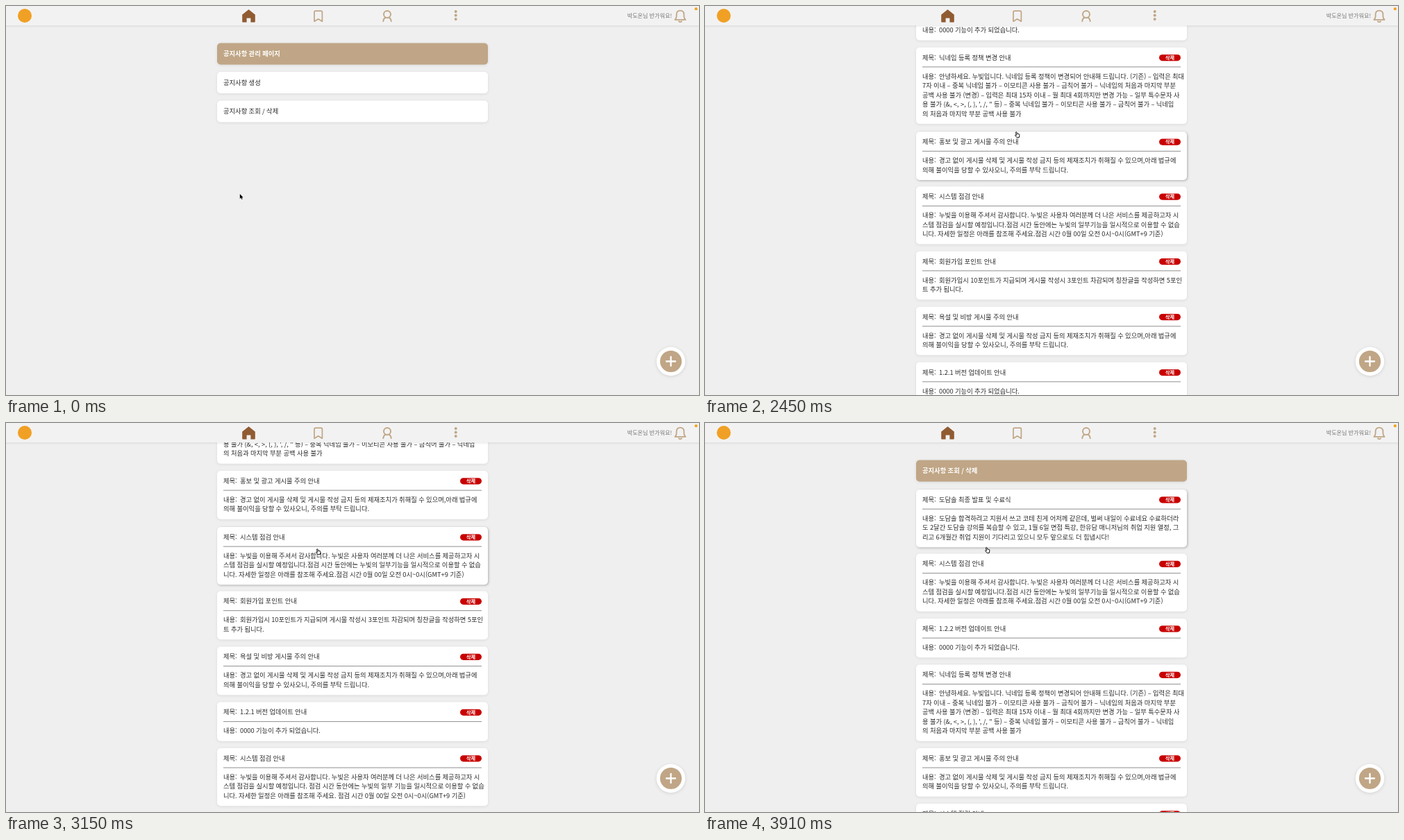
An HTML page with a canvas for the animation above (3970 ms loop, 998 px wide and 561 px high).

```html
<!DOCTYPE html>
<html lang="ko">
<head>
<meta charset="utf-8">
<title>공지사항</title>
<style>
html, body { margin: 0; width: 100%; height: 100%; overflow: hidden; background: #efefef; }
canvas { display: block; width: 998px; height: 561px; }
</style>
</head>
<body>
<canvas id="stage"></canvas>
<script>
const W = 998, H = 561, LOOP = 3970, STEP = 50;
const TAN = '#c0a686', BROWN = '#915b32', INK = '#2b2b2b';
const FAMILY = '"Noto Sans CJK KR", "Noto Sans CJK", sans-serif';
const LEFT = 304, WIDTH = 390, TEXT_X = 313, VALUE_X = 337;
const LIST_AT = 1700, OPEN_AT = 700;

const canvas = document.getElementById('stage');
const ctx = canvas.getContext('2d');
const dpr = window.devicePixelRatio || 1;
canvas.width = W * dpr;
canvas.height = H * dpr;

const maintenance = [
  '누빛을 이용해 주셔서 감사합니다. 누빛은 사용자 여러분께 더 나은 서비스를 제공하고자 시',
  '스템 점검을 실시할 예정입니다.점검 시간 동안에는 누빛의 일부기능을 일시적으로 이용할 수 없습',
  '니다. 자세한 일정은 아래를 참조해 주세요.점검 시간 0월 00일 오전 0시~0시(GMT+9 기준)'
];
const warning = [
  '경고 없이 게시물 삭제 및 게시물 작성 금지 등의 제재조치가 취해질 수 있으며,아래 법규에',
  '의해 불이익을 당할 수 있사오니, 주의를 부탁 드립니다.'
];
const update = ['0000 기능이 추가 되었습니다.'];

const notices = [
  ['도담솔 최종 발표 및 수료식', [
    '도담솔 합격하려고 지원서 쓰고 코테 친게 어저께 같은데, 벌써 내일이 수료네요 수료하더라',
    '도 2달간 도담솔 강의를 복습할 수 있고, 1월 6일 면접 특강, 한유담 매니저님의 취업 지원 열정, 그',
    '리고 6개월간 취업 지원이 기다리고 있으니 모두 앞으로도 더 힘냅시다!']],
  ['시스템 점검 안내', maintenance],
  ['1.2.2 버전 업데이트 안내', update],
  ['닉네임 등록 정책 변경 안내', [
    '안녕하세요. 누빛입니다. 닉네임 등록 정책이 변경되어 안내해 드립니다. (기존) – 입력은 최대',
    '7자 이내 – 중복 닉네임 불가 – 이모티콘 사용 불가 – 금칙어 불가 – 닉네임의 처음과 마지막 부분',
    '공백 사용 불가 (변경) – 입력은 최대 15자 이내 – 월 최대 4회까지만 변경 가능 – 일부 특수문자 사',
    '용 불가 (&, <, >, (, ), \', /, " 등) – 중복 닉네임 불가 – 이모티콘 사용 불가 – 금칙어 불가 – 닉네임',
    '의 처음과 마지막 부분 공백 사용 불가']],
  ['홍보 및 광고 게시물 주의 안내', warning],
  ['시스템 점검 안내', maintenance],
  ['회원가입 포인트 안내', [
    '회원가입시 10포인트가 지급되며 게시물 작성시 3포인트 차감되며 칭찬글을 작성하면 5포인',
    '트 추가 됩니다.']],
  ['욕설 및 비방 게시물 주의 안내', warning],
  ['1.2.1 버전 업데이트 안내', update],
  ['시스템 점검 안내', maintenance.map(s => s.replace('.점검', '. 점검').replace('일부기능', '일부 기능'))]
];

const clamp = (v, a, b) => Math.min(b, Math.max(a, v));
const span = (t, a, b) => clamp((t - a) / (b - a), 0, 1);
const smooth = u => u * u * (3 - 2 * u);
const lerp = (a, b, u) => a + (b - a) * u;

function scrollAt(t) {
  if (t < 3180) return 400 * (1 - (1 - span(t, 2100, 3108)) ** 3);
  return 400 * (1 - span(t, 3180, 3780)) ** 2;
}

// Pointer legs: start, end, target x, target y
const legs = [
  [0, 450, 415.5, 153.2],
  [1650, 1850, 436, 173],
  [2100, 2350, 448, 181.3],
  [3700, 3900, 405, 179]
];
function pointerAt(t) {
  let x = 336.8, y = 271;
  for (const [a, b, tx, ty] of legs) {
    const u = smooth(span(t, a, b));
    x = lerp(x, tx, u);
    y = lerp(y, ty, u);
  }
  return { x, y };
}

function text(s, x, mid, color = INK, size = 9.3, weight = 400, align = 'left') {
  ctx.font = `${weight} ${size}px ${FAMILY}`;
  ctx.fillStyle = color;
  ctx.textAlign = align;
  ctx.wordSpacing = '0.3px';
  ctx.fillText(s, x, mid + size * 0.375);
}

function box(x, y, w, h, r, color) {
  ctx.fillStyle = color;
  ctx.beginPath();
  ctx.roundRect(x, y, w, h, r);
  ctx.fill();
}

function disc(x, y, r, color) {
  ctx.fillStyle = color;
  ctx.beginPath();
  ctx.arc(x, y, r, 0, Math.PI * 2);
  ctx.fill();
}

function shadowed(dx, dy, blur, alpha, draw) {
  ctx.save();
  ctx.shadowColor = `rgba(0,0,0,${alpha})`;
  ctx.shadowOffsetX = dx * dpr;
  ctx.shadowOffsetY = dy * dpr;
  ctx.shadowBlur = blur * dpr;
  draw();
  ctx.restore();
}

function card(y, h, hover, color = '#fff') {
  const draw = () => box(LEFT, y, WIDTH, h, 5, color);
  if (hover) shadowed(1, 1, 3.5, 0.28, draw);
  else shadowed(0, 1, 4, 0.09, draw);
}

function isOver(p, y, h) {
  return p.x > LEFT && p.x < LEFT + WIDTH && p.y >= y && p.y <= y + h + 1;
}

function pageTitle(s, scroll = 0) {
  card(53.5 - scroll, 31, false, TAN);
  text(s, TEXT_X, 69 - scroll, '#fff', 9.3, 700);
}

function menuPage(p) {
  pageTitle('공지사항 관리 페이지');
  let hit = false;
  ['공지사항 생성', '공지사항 조회 / 삭제'].forEach((s, i) => {
    const y = 95 + i * 41.5;
    const hover = isOver(p, y, 31);
    const shift = hover ? 1 : 0;
    card(y + shift, 31, hover);
    text(s, TEXT_X, y + 15.5 + shift, INK, 9.3, 500);
    hit = hit || hover;
  });
  pointer(p, hit);
}

function emptyPage(p) {
  pageTitle('공지사항 조회 / 삭제');
  card(95, 29.5, false);
  text('공지사항이 없습니다', TEXT_X, 109.3);
  pointer(p, false);
}

function notice(title, lines, y, h, hover) {
  card(y, h, hover);
  text('제목:', TEXT_X, y + 14.4);
  text(title, VALUE_X, y + 14.4);
  box(654, y + 10.2, 31, 9.2, 4.6, '#c80000');
  text('삭제', 669.5, y + 14.4, '#fff', 7.2, 700, 'center');
  ctx.fillStyle = '#8f8f8f';
  ctx.fillRect(TEXT_X, y + 27.6, 372, 1);
  text('내용:', TEXT_X, y + 41.3);
  lines.forEach((s, i) => text(s, i ? TEXT_X : VALUE_X, y + 41.3 + i * 13.5));
}

function listPage(p, scroll) {
  pageTitle('공지사항 조회 / 삭제', scroll);
  let y = 95 - scroll;
  for (const [title, lines] of notices) {
    const h = 42.8 + 13.5 * lines.length;
    const hover = isOver(p, y, h);
    if (y + h > 0 && y < H) notice(title, lines, y + (hover ? 1 : 0), h, hover);
    y += h + 10.2;
  }
  pointer(p, true);
}

function stroke(d, color, width) {
  ctx.strokeStyle = color;
  ctx.lineWidth = width;
  ctx.lineJoin = ctx.lineCap = 'round';
  ctx.stroke(new Path2D(d));
}

function topBar() {
  shadowed(0, 1, 3, 0.1, () => {
    ctx.fillStyle = '#f2f2f2';
    ctx.fillRect(-10, -10, W + 20, 38);
  });
  disc(27, 14, 10, '#f0a024');
  ctx.fillStyle = BROWN;
  ctx.fill(new Path2D('M349.5 5 L358.8 12.6 V22.6 Q358.8 23.6 357.8 23.6 H352.4 V17.6 H346.6 V23.6 H341.2 Q340.2 23.6 340.2 22.6 V12.6 Z'));
  stroke('M444 22.2 V9 Q444 7.2 445.8 7.2 H453.6 Q455.4 7.2 455.4 9 V22.2 L449.7 18.8 Z', TAN, 1.7);
  stroke('M554 12 A5 5 0 1 1 544 12 A5 5 0 1 1 554 12 M543.3 22 Q543.8 17.6 547 16.7 M554.7 22 Q554.2 17.6 551 16.7', TAN, 1.9);
  for (const y of [8, 13.5, 19]) disc(647.7, y, 2, TAN);
  text('박도온님 반가워요!', 959, 14.3, '#777', 8.1, 400, 'right');
  stroke('M963.4 19.8 H978.6 Q976.4 17.6 976.4 15 V12.2 Q976.4 6.6 971 6.6 Q965.6 6.6 965.6 12.2 V15 Q965.6 17.6 963.4 19.8 Z M969 22.3 Q971 24 973 22.3', TAN, 1.8);
  disc(993.8, 4.2, 2.1, '#f5a11c');
}

function addButton() {
  shadowed(0, 1, 5, 0.12, () => disc(957.5, 512.5, 20.7, '#fff'));
  disc(957.5, 512.5, 15.6, TAN);
  stroke('M951 512.5 H964 M957.5 506 V519', '#fff', 2.3);
}

const ARROW = new Path2D('M0 0 V7 L1.6 5.6 L2.7 8 L3.8 7.5 L2.8 5.2 H4.9 Z');
const HAND = new Path2D('M1 0.6 Q1.9 -0.2 2.4 0.8 L2.8 3 L5.4 3.3 Q6.4 3.6 6.2 5 L5.6 8.4 H2.4 L0.1 5.6 Q-0.4 4.6 0.6 4.5 L1.5 5 Z');

function pointer(p, hand) {
  ctx.save();
  ctx.translate(p.x - (hand ? 1.3 : 0), p.y);
  ctx.lineJoin = 'round';
  ctx.lineWidth = 1;
  if (hand) {
    ctx.fillStyle = '#fff';
    ctx.fill(HAND);
    ctx.strokeStyle = '#111';
    ctx.stroke(HAND);
  } else {
    ctx.strokeStyle = '#fff';
    ctx.stroke(ARROW);
    ctx.fillStyle = '#000';
    ctx.fill(ARROW);
  }
  ctx.restore();
}

function draw(t) {
  ctx.setTransform(dpr, 0, 0, dpr, 0, 0);
  ctx.fillStyle = '#efefef';
  ctx.fillRect(0, 0, W, H);
  const p = pointerAt(t);
  if (t < OPEN_AT) menuPage(p);
  else if (t < LIST_AT) emptyPage(p);
  else listPage(p, scrollAt(t));
  topBar();
  addButton();
}

const start = performance.now();
function tick() {
  const t = (performance.now() - start) % LOOP;
  draw(Math.floor(t / STEP) * STEP);
  requestAnimationFrame(tick);
}
tick();
</script>
</body>
</html>
```
